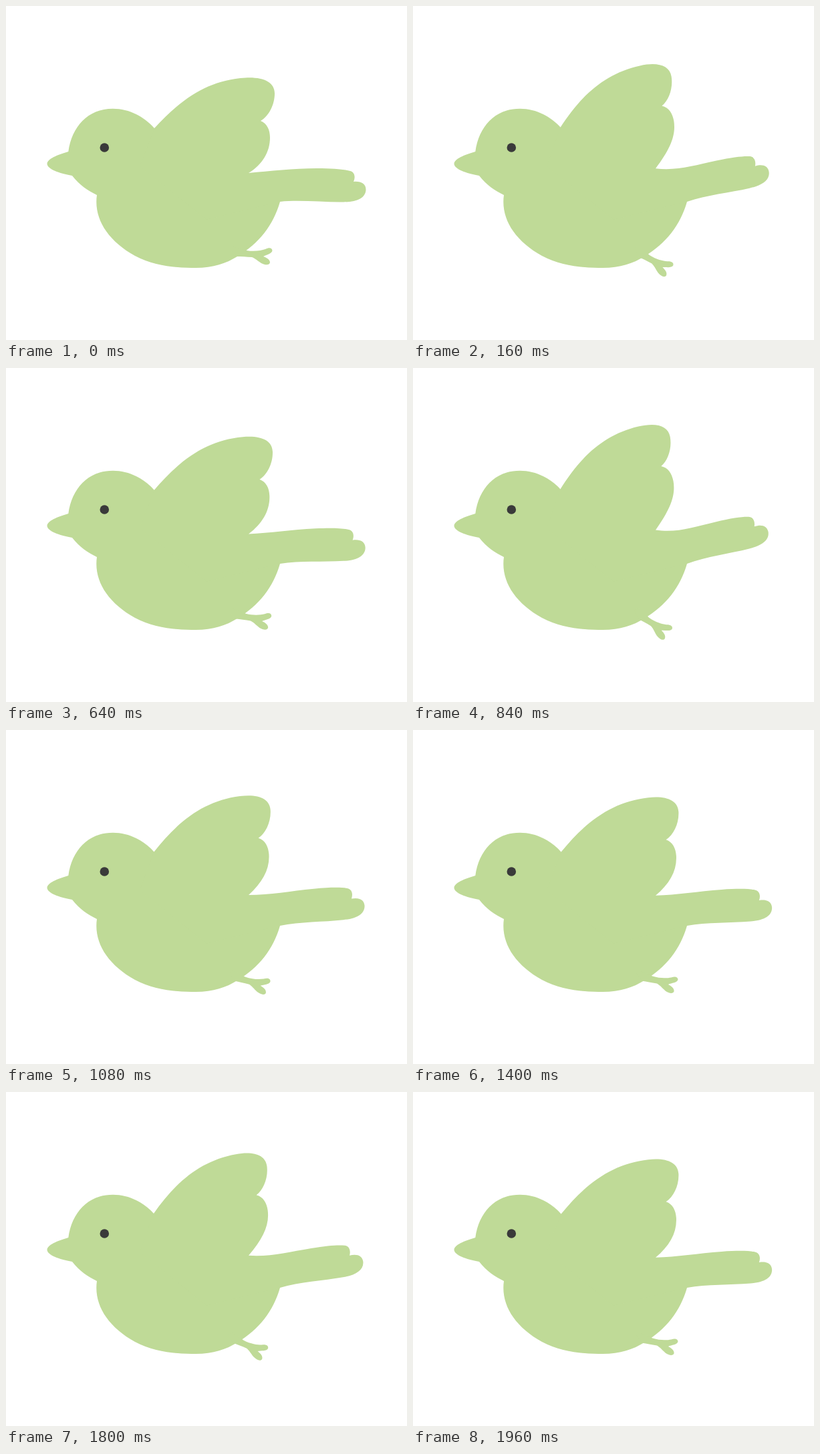
Write an HTML page that moves like this. It is 600 px wide and 500 px high and loops after 2 s.

```html
<!DOCTYPE html>
<html lang="en">
<head>
<meta charset="utf-8">
<title>Flying bird</title>
<style>
  html, body { margin: 0; width: 100%; height: 100%; overflow: hidden; background: #fff; }
  svg { display: block; width: 600px; height: 500px; }
</style>
</head>
<body>
<svg viewBox="0 0 600 500">
  <g fill="#bfda97">
    <path d="M93.3 218C98.5 181 122 153.8 160 153.8C185 153.8 207 166 222 183L410 293
      C400 328 379 355 346 375C330 385 310 392 284 392C262 392 224 391 193 374
      C152 351 131 318 136 283C122 276 110 268 99 254C72 249 61.5 242 61.5 236
      C62 229 76 223 93.3 218Z"/>
    <path id="limbs"/>
    <path id="foot" d="M340 360L360 366C372 368 382 366 388 364C394 361 398 362 398.5 366
      C398 371 390 372 385 375C391 377 395 380 395 384C394 388.5 388 388 382 385
      C376 381 373 378 368 376C360 375.5 352 375 346 375L335 365Z"/>
  </g>
  <circle cx="147.3" cy="212" r="6.8" fill="#3a3a3a"/>
</svg>
<script>
const LOOP = 2000, STEP = 40;
const limbs = document.getElementById('limbs');
const foot = document.getElementById('foot');

// Returns a function that turns a list of x,y pairs about a pivot.
function turner(px, py, degrees) {
  const a = degrees * Math.PI / 180, c = Math.cos(a), s = Math.sin(a);
  return (...xy) => {
    const out = [];
    for (let i = 0; i < xy.length; i += 2) {
      const x = xy[i] - px, y = xy[i + 1] - py;
      out.push((px + x * c - y * s).toFixed(2), (py + x * s + y * c).toFixed(2));
    }
    return out.join(' ');
  };
}

// lift: 0 = wing low, 1 = wing high
function pose(lift) {
  const wing = turner(236, 214, -10.2 * lift);
  const tail = turner(405, 290, -13.3 * lift);
  const shoulder = `${222 - 2.5 * lift} 183`;
  const rump = `363 ${250 - 7.5 * lift}`;
  limbs.setAttribute('d', `M${shoulder}
    C${wing(263, 138, 304, 110.5, 358, 107.5)}
    C${wing(385, 106, 402, 114, 402, 131)}
    C${wing(402, 148, 393, 165, 381, 172)}
    C${wing(391, 176, 395, 186, 395, 197)}
    C${wing(395, 219, 383, 238)} ${rump}
    C395 247 ${tail(430, 243, 465, 243)}
    C${tail(490, 243, 506, 244.5, 515, 247)}
    C${tail(522, 249, 523, 256, 520, 263)}
    C${tail(531, 262, 538.5, 266, 538.5, 275)}
    C${tail(538, 287.5, 525, 293.5, 505, 293.5)}
    C${tail(475, 294, 440, 290)} 410 293
    L300 320L200 240Z`);
  foot.setAttribute('transform', `rotate(${26 * lift} 340 355)`);
}

// A linear up-and-down beat of 20 ticks at 60 per second, shown every 40 ms.
function liftAt(ms) {
  const k = Math.floor((ms % LOOP) / STEP);
  const tick = Math.max(0, Math.ceil(k * 12 / 5) - 1) % 20;
  return Math.min(tick, 20 - tick) / 10;
}

const start = performance.now();
function draw() {
  pose(liftAt(Math.max(0, performance.now() - start)));
  requestAnimationFrame(draw);
}
draw();
</script>
</body>
</html>
```
